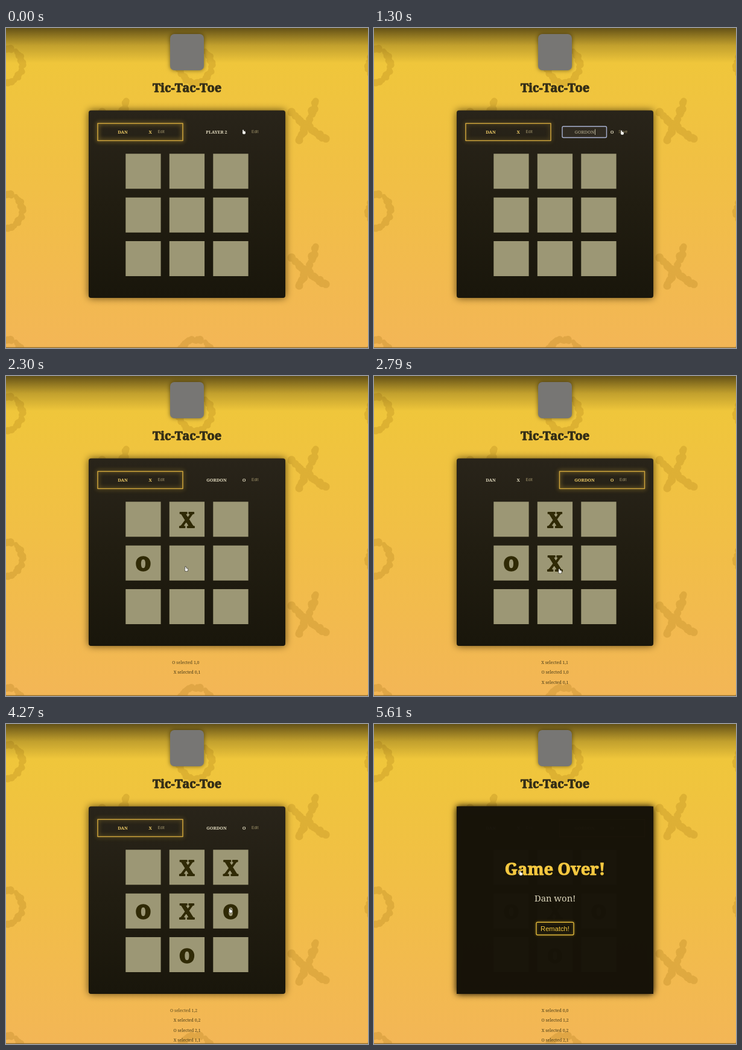
An HTML page with a canvas that plays this animation: 600 px wide and 530 px high, repeating every 5640 ms.

```html
<!DOCTYPE html>
<html lang="en">
<head>
<meta charset="utf-8">
<title>Tic-Tac-Toe</title>
<style>
html, body { margin: 0; width: 100%; height: 100%; overflow: hidden; background: #f1bf48; }
canvas { display: block; }
</style>
</head>
<body>
<canvas id="stage" width="600" height="530"></canvas>
<script>
const W = 600, H = 530, LOOP = 5640;
const SLAB = '"Noto Serif", serif', SANS = '"Liberation Sans", Arial, sans-serif';
const GOLD = '#f4c840', PALE = '#e3dcc0', INK = '#302a06';
const FIRST = 'DAN', SECOND = 'GORDON';
const PANEL = [137, 136.5, 326, 310.5];

// [time, row, column]; X begins and the players alternate
const MOVES = [[1465, 0, 1], [1980, 1, 0], [2380, 1, 1], [2990, 2, 1],
  [3480, 0, 2], [4025, 1, 2], [4615, 0, 0]];
const EDIT = 200, CLEAR = 500, TYPE = 760, KEY = 95, SAVE = 1330;
const OVER = 4615, POP = 680, SLIDE = 600;

// [time, x, y] stops of the pointer
const PATH = [[0, 394, 172], [130, 411, 173], [1300, 411, 173], [1440, 296, 256],
  [1560, 290, 261], [1790, 290, 261], [1960, 229, 312], [2080, 229, 312],
  [2340, 303, 320], [2500, 308, 323], [2800, 308, 323], [2960, 301, 386],
  [3120, 301, 386], [3440, 371, 245], [3600, 371, 245], [3960, 372, 309],
  [4290, 372, 309], [4570, 243, 247], [LOOP, 243, 247]];

const ctx = document.getElementById('stage').getContext('2d');
const clamp = v => v < 0 ? 0 : v > 1 ? 1 : v;

function label(c, str, x, y, size, color, { font = SLAB, weight = 400, fat = 0 } = {}) {
  c.font = `${weight} ${size}px ${font}`;
  c.textAlign = 'center';
  c.textBaseline = 'alphabetic';
  c.fillStyle = c.strokeStyle = color;
  c.lineWidth = fat;
  c.lineJoin = 'round';
  if (fat) c.strokeText(str, x, y);
  c.fillText(str, x, y);
}

function box(c, x, y, w, h, r, fill, stroke, line = 1.5) {
  c.beginPath();
  c.roundRect(x, y, w, h, r);
  if (fill) { c.fillStyle = fill; c.fill(); }
  if (stroke) { c.strokeStyle = stroke; c.lineWidth = line; c.stroke(); }
}

function shadow(c, color, blur) {
  c.shadowColor = color;
  c.shadowBlur = blur;
}

function ramp(c, y0, y1, ...colors) {
  const g = c.createLinearGradient(0, y0, 0, y1);
  colors.forEach((color, i) => g.addColorStop(i / (colors.length - 1), color));
  return g;
}

// A brush mark with a ragged edge, following point(u) for u in 0..1
function brush(c, point, steps, radius, rnd) {
  for (let i = 0; i <= steps; i++) {
    const [x, y] = point(i / steps);
    const r = radius * (0.65 + 0.5 * rnd());
    const px = x + (rnd() - 0.5) * 4, py = y + (rnd() - 0.5) * 4;
    c.moveTo(px + r, py);
    c.arc(px, py, r, 0, 7);
  }
}

function markO(c, x, y, rnd) {
  brush(c, u => [x + 27 * Math.cos(u * 6.1 - 1), y + 28 * Math.sin(u * 6.1 - 1)], 60, 5.5, rnd);
}

function markX(c, x, y, rnd) {
  brush(c, u => [x + 13 - 29 * u + 4 * Math.sin(u * 3), y - 31 + 63 * u], 30, 6, rnd);
  brush(c, u => [x - 28 + 57 * u, y - 13 + 43 * u + 3 * Math.sin(u * 3)], 30, 6, rnd);
}

function makeBackdrop() {
  const canvas = document.createElement('canvas');
  canvas.width = W;
  canvas.height = H;
  const c = canvas.getContext('2d');
  c.fillStyle = ramp(c, 0, H, '#efc838', '#f1bf46', '#f3b656');
  c.fillRect(0, 0, W, H);

  c.beginPath();
  for (let i = 0; i < 3; i++) for (let j = 0; j < 3; j++) {
    let seed = 7;
    const rnd = () => (seed = seed * 16807 % 2147483647) / 2147483647;
    markO(c, 314 * i, 62 + 241 * j, rnd);
    markX(c, 186 + 314 * i, 152 + 241 * j, rnd);
  }
  c.fillStyle = 'rgba(150,105,10,.21)';
  c.fill();

  c.fillStyle = ramp(c, 0, 58, 'rgba(45,35,10,.72)', 'rgba(60,45,10,.25)', 'rgba(60,45,10,0)');
  c.fillRect(0, 0, W, 58);
  c.fillStyle = '#8f6c30';
  c.fillRect(0, 528.7, W, 1.3);

  shadow(c, 'rgba(0,0,0,.5)', 7);
  box(c, 272, 10, 56, 60, 7, '#777674');
  shadow(c, 'transparent', 0);
  label(c, 'Tic-Tac-Toe', 300, 105.5, 20, '#332d16', { weight: 900, fat: 0.9 });

  shadow(c, 'rgba(40,28,0,.75)', 13);
  box(c, ...PANEL, 4, ramp(c, 136, 447, '#29241a', '#211d11', '#19160b'));
  return canvas;
}

const backdrop = makeBackdrop();

function player(x, name, mark, active, since, editing) {
  const color = active ? '#f0cd66' : PALE;
  if (active) {
    const pulse = 0.3 + 0.7 * Math.sin(Math.PI * since / 1000) ** 2;
    shadow(ctx, `rgba(248,200,60,${pulse})`, 7);
    box(ctx, x + 0.5, 158, 141, 28.5, 0, null, '#cfa53c');
    shadow(ctx, 'transparent', 0);
  }
  if (!editing) label(ctx, name, x + 42, 175, 7.3, color, { weight: 700 });
  label(ctx, mark, x + 87.7, 175, 7.3, color, { weight: 700 });
  label(ctx, editing ? 'Save' : 'Edit', x + 105.7, 174.3, 6.5, '#a0936a', { font: SANS });
}

function nameField(t) {
  const typed = t < TYPE ? 0 : Math.floor((t - TYPE) / KEY) + 1;
  const value = t < CLEAR ? 'PLAYER 2' : SECOND.slice(0, typed);
  box(ctx, 312, 163, 73.5, 18.5, 2, '#302b22', '#a9b2d2', 1.4);
  label(ctx, value, 349, 175, 7.6, '#b9b193');
  ctx.fillStyle = PALE;
  ctx.fillRect(349.5 + ctx.measureText(value).width / 2, 167.5, 0.8, 9.5);
}

function board(moves) {
  for (let r = 0; r < 3; r++) for (let c = 0; c < 3; c++)
    box(ctx, 198.3 + 72.5 * c, 208.3 + 72.4 * r, 58.3, 58, 0, '#9c9775');
  moves.forEach(([, r, c], i) => {
    const x = 227.4 + 72.5 * c, y = 250.5 + 72.4 * r;
    if (i % 2) label(ctx, 'O', x, y - 0.6, 31, INK, { weight: 900, fat: 3.4 });
    else label(ctx, 'X', x, y, 34, INK, { weight: 900, fat: 1.8 });
  });
}

function log(t, moves) {
  [...moves].reverse().forEach(([at, r, c], i) => {
    const left = (1 - clamp((t - at) / SLIDE)) ** 4;
    const mark = (moves.length - 1 - i) % 2 ? 'O' : 'X';
    ctx.globalAlpha = 1 - left;
    label(ctx, `${mark} selected ${r},${c}`, 300 - 45 * left, 477 + 16.3 * i, 7, '#4b3d18');
  });
  ctx.globalAlpha = 1;
}

// Cubic bezier .175, .885, .32, 1.275
function backOut(x) {
  const curve = (s, a, b) => 3 * (1 - s) ** 2 * s * a + 3 * (1 - s) * s * s * b + s ** 3;
  let lo = 0, hi = 1;
  for (let i = 0; i < 20; i++) {
    const mid = (lo + hi) / 2;
    if (curve(mid, 0.175, 0.32) < x) lo = mid; else hi = mid;
  }
  return curve(lo, 0.885, 1.275);
}

function gameOver(t) {
  const scale = backOut(clamp((t - OVER) / POP));
  ctx.save();
  ctx.translate(300, 291.5);
  ctx.scale(scale, scale);
  ctx.translate(-300, -291.5);
  ctx.globalAlpha = clamp(scale);
  shadow(ctx, 'rgba(0,0,0,.65)', 9);
  box(ctx, ...PANEL, 0, 'rgba(24,20,9,.95)');
  shadow(ctx, 'transparent', 0);
  label(ctx, 'Game Over!', 300, 250.5, 27.5, GOLD, { weight: 900, fat: 1 });
  label(ctx, 'Dan won!', 300, 293.5, 14.8, '#dcd6bb');
  shadow(ctx, 'rgba(248,200,60,.4)', 4);
  box(ctx, 269, 328.3, 62, 21, 2, '#1b170b', GOLD, 1.2);
  shadow(ctx, 'transparent', 0);
  label(ctx, 'Rematch!', 300, 342.5, 11.2, GOLD, { font: SANS });
  ctx.restore();
}

function pointer(t) {
  if (t > CLEAR && t < SAVE - 100) return;
  const i = PATH.findIndex(p => p[0] > t);
  const [t0, x0, y0] = PATH[i - 1], [t1, x1, y1] = PATH[i];
  const u = (t - t0) / (t1 - t0), e = u * u * (3 - 2 * u);
  ctx.save();
  ctx.translate(x0 + (x1 - x0) * e, y0 + (y1 - y0) * e);
  ctx.beginPath();
  ctx.roundRect(-1.8, -3.6, 1.8, 6, 0.9);
  ctx.roundRect(-2, -0.9, 5, 4.6, 1.6);
  ctx.strokeStyle = '#222';
  ctx.lineWidth = 1.2;
  ctx.stroke();
  ctx.fillStyle = '#f4f2ea';
  ctx.fill();
  ctx.restore();
}

function draw(t) {
  const moves = MOVES.filter(m => m[0] <= t);
  const since = t - (moves.length ? moves[moves.length - 1][0] : -500);
  const editing = t >= EDIT && t < SAVE;
  const second = moves.length % 2 === 1;

  ctx.drawImage(backdrop, 0, 0);
  player(151.5, FIRST, 'X', !second, since, false);
  player(307, t < SAVE ? 'PLAYER 2' : SECOND, 'O', second, since, editing);
  if (editing) nameField(t);
  board(moves);
  log(t, moves);
  if (t >= OVER) gameOver(t);
  pointer(t);
}

const start = performance.now();
function tick() {
  draw((performance.now() - start) % LOOP);
  requestAnimationFrame(tick);
}
tick();
</script>
</body>
</html>
```
